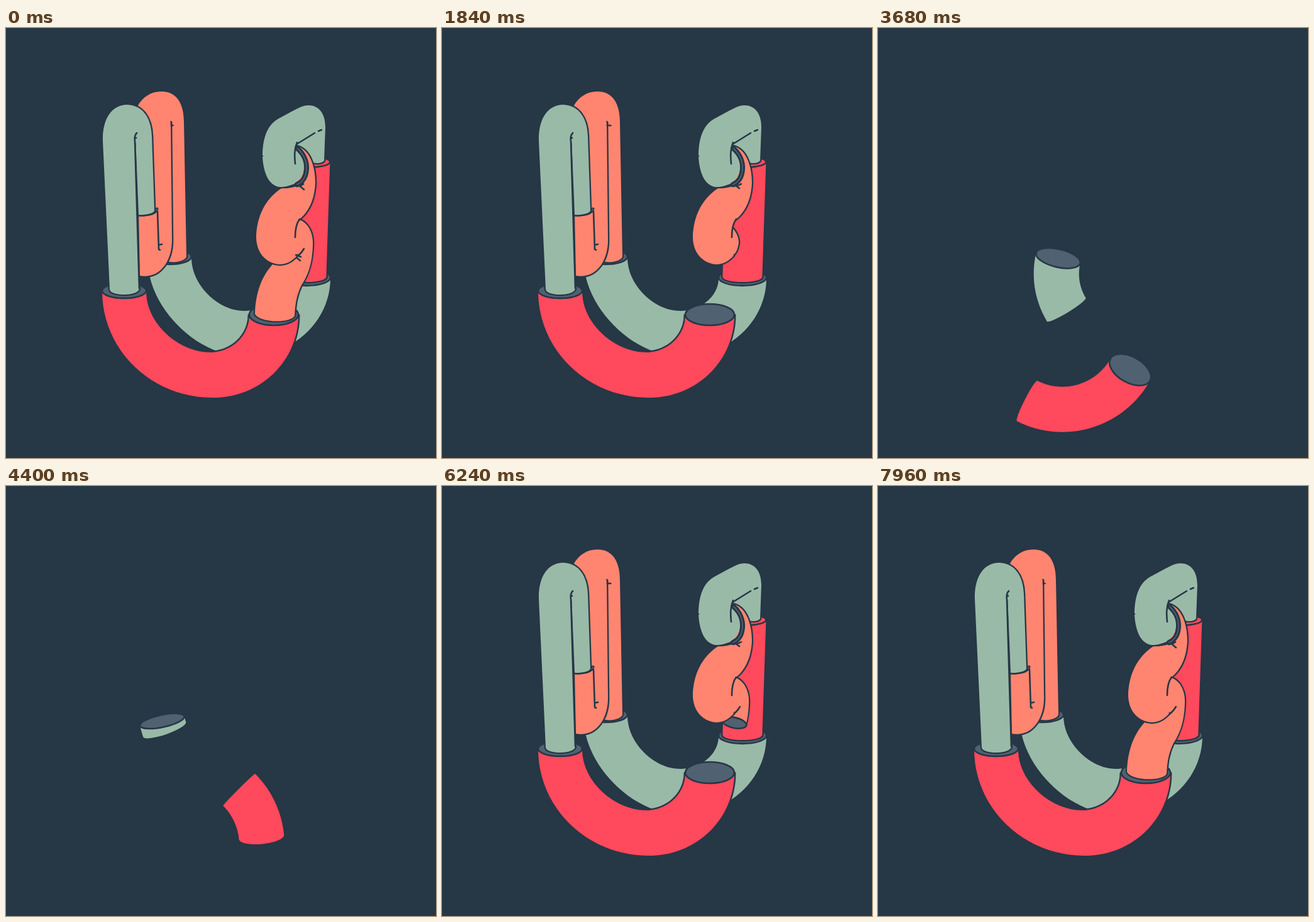
An HTML page for the animation above (8000 ms loop, 684 by 684 pixels).

```html
<!DOCTYPE html>
<html>
<head>
<meta charset="utf-8">
<style>
html, body { margin: 0; height: 100%; overflow: hidden; background: #263746; }
svg { display: block; width: 684px; height: 684px; }
.pipe { stroke: #263746; stroke-width: 5; stroke-linejoin: round; paint-order: stroke; }
</style>
</head>
<body>
<svg id="stage" viewBox="0 0 684 684"></svg>
<script>
const LOOP = 8000, INK = '#263746', RED = '#ff495c', GREEN = '#9abaa8', ORANGE = '#ff8570', SLATE = '#506172';
const stage = document.getElementById('stage');

function add(tag, attrs, parent = stage) {
  const el = document.createElementNS('http://www.w3.org/2000/svg', tag);
  set(el, attrs);
  return parent.appendChild(el);
}
function set(el, attrs) {
  for (const k in attrs) el.setAttribute(k, attrs[k]);
}
const show = (el, on) => { el.style.display = on ? '' : 'none'; };
const clamp = x => Math.min(1, Math.max(0, x));
const mix = (a, b, k) => a + (b - a) * k;
const line = (d, parent, width = 2.6, stroke = INK) => add('path', {
  d, fill: 'none', stroke, 'stroke-width': width, 'stroke-linecap': 'round', 'stroke-linejoin': 'round'
}, parent);

// Linear interpolation through rows of [time, ...values]
function track(keys, t) {
  const i = keys.findIndex(k => k[0] > t);
  if (i < 0) return keys[keys.length - 1].slice(1);
  const a = keys[i - 1], b = keys[i], k = (t - a[0]) / (b[0] - a[0]);
  return a.slice(1).map((v, j) => mix(v, b[j + 1], k));
}

// Open end of a pipe facing (dx, dy): slate when turned to the viewer, else a bulge
function placeCap(el, x, y, hw, dx, dy, color, gain = 1, forced = 0) {
  const vis = forced || gain * (0.3 * dx - 0.34 * dy), open = vis > 0.06;
  set(el, {
    rx: hw, ry: hw * Math.abs(vis), fill: open ? SLATE : color, stroke: open ? INK : 'none', 'stroke-width': 2.6,
    transform: `translate(${x} ${y}) rotate(${Math.atan2(dy, dx) * 180 / Math.PI + 90})`
  });
}

// Curved pipe: a half bowl at rest, a turning piece of a circle when k is 1
function bowl(o) {
  const body = add('path', { class: 'pipe', fill: o.color });
  const caps = [add('ellipse', {}), add('ellipse', {})];
  return t => {
    const [a0, a1, cx, cy, k] = track(o.keys, t);
    const at = deg => {
      const a = deg * Math.PI / 180, c = Math.cos(a), s = Math.sin(a), [rx, ry] = c < 0 ? o.left : o.right;
      return [mix(o.x + c * rx, cx + o.r * c, k), mix(o.y - (1 - s) * ry, cy + o.r * s, k)];
    };
    const dir = deg => {
      const p = at(deg - 0.5), q = at(deg + 0.5), x = q[0] - p[0], y = q[1] - p[1], n = Math.hypot(x, y);
      return [x / n, y / n];
    };
    const half = deg => {
      const c = Math.cos(deg * Math.PI / 180);
      return mix(c < 0 ? 36 + c : 36 + c * o.flare, 36, k);
    };
    const outer = [], inner = [];
    for (let i = 0; i <= 48; i++) {
      const a = mix(a0, a1, i / 48), p = at(a), d = dir(a), h = half(a);
      const bend = a > 90 ? (1 - k) * Math.sin(a * Math.PI / 90) ** 2 : 0;
      const out = h - o.dip * bend, into = h + 2 * bend;
      outer.push([p[0] + d[1] * out, p[1] - d[0] * out]);
      inner.unshift([p[0] - d[1] * into, p[1] + d[0] * into]);
    }
    set(body, { d: 'M' + outer.concat(inner).map(p => p.map(v => v.toFixed(2)).join(' ')).join('L') + 'Z' });
    [a0, a1].forEach((a, i) => {
      const [x, y] = at(a), [dx, dy] = dir(a), s = i ? 1 : -1;
      placeCap(caps[i], x, y - (1 - k), half(a), s * dx, s * dy, o.color, i ? 1 : o.gain);
    });
  };
}

// Drawn piece uncovered along a guide line; grow and shrink are time spans
let count = 0;
function piece(o) {
  const id = 'm' + count++;
  const mask = add('mask', { id, maskUnits: 'userSpaceOnUse', x: 0, y: 0, width: 684, height: 684 });
  const guide = add('path', { d: o.guide, fill: 'none', stroke: '#fff', 'stroke-width': o.width }, mask);
  const g = add('g', {});
  line(o.edge, g, 4.6);
  add('path', { d: o.fill, fill: o.color }, g);
  if (o.crease) line(o.crease, g);
  if (o.extra) o.extra(g);
  const cap = o.cap && add('ellipse', {});
  const length = guide.getTotalLength();
  const tick = t => {
    const part = ([a, b]) => clamp((t - a) / (b - a));
    const p = t < 4000 ? 1 - part(o.shrink) : part(o.grow);
    show(g, p > 0);
    if (p < 1) {
      g.setAttribute('mask', `url(#${id})`);
      guide.setAttribute('stroke-dasharray', `${p * length} ${length * 2}`);
    } else g.removeAttribute('mask');
    if (!cap) return;
    show(cap, p > 0 && p < 1);
    const e = guide.getPointAtLength(p * length), b = guide.getPointAtLength(p * length - 1);
    const f = guide.getPointAtLength(p * length + 1), x = f.x - b.x, y = f.y - b.y, n = Math.hypot(x, y) || 1;
    placeCap(cap, e.x, e.y, mix(o.cap[0], o.cap[1], p), x / n, y / n, o.color, 1, o.open);
  };
  tick.group = g;
  return tick;
}

function straightPipe() {
  const w = 31.5, body = add('path', { class: 'pipe', fill: RED });
  const lip = add('ellipse', { rx: w, ry: 8.5, fill: RED, stroke: INK, 'stroke-width': 2.6 });
  const keys = [[0, 213, 396], [2480, 213, 396], [2820, 290, 291], [5020, 290, 291], [5060, 288, 305],
    [5240, 277.5, 331], [5480, 213, 396]];
  return t => {
    const [top, low] = track(keys, t), on = t < 2820 || t > 5020;
    const mid = y => 484 - (y - 210) * 0.033, a = mid(top), b = mid(low);
    show(body, on);
    show(lip, on);
    set(body, { d: `M${a - w} ${top}L${b - w} ${low}A${w} 8 0 0 0 ${b + w} ${low}L${a + w} ${top}A${w} 8.5 0 0 0 ${a - w} ${top}Z` });
    set(lip, { cx: a, cy: top });
  };
}

let sideMark, knotMark, pinch;

const backBowl = bowl({
  color: GREEN, x: 380, y: 486, left: [120, 121], right: [98, 88], r: 110, flare: 2, dip: 4, gain: 1,
  keys: [[0, 0, 180, 378, 372, 0], [2760, 0, 180, 378, 372, 0], [3120, 115, 222, 433, 420, 1],
    [3400, 140, 205, 412, 411, 1], [4200, 165, 171, 360, 354, 1], [4400, 161, 168, 356, 351, 1],
    [4850, 45, 180, 378, 372, 0.1], [5040, 25, 180, 378, 372, 0], [5240, 14, 180, 378, 372, 0],
    [5400, 0, 180, 378, 372, 0]]
});
const redPipe = straightPipe();

const farLeg = piece({
  color: ORANGE, shrink: [2150, 2600], grow: [5560, 5860], width: 84, cap: [12, 14],
  guide: 'M235 190C235 125 268 120 272 160L273 380',
  fill: 'M256 371C268 375 287 370 287 363L283 150C283 118 270 101 247 101C230 101 218 110 210 123L240 180L263 150Z',
  edge: 'M256 371C268 375 287 370 287 363L283 150C283 118 270 101 247 101C230 101 218 110 210 123'
});
const bend = piece({
  color: ORANGE, shrink: [2550, 2750], grow: [5365, 5600], width: 54,
  guide: 'M228 284V350C230 395 252 395 253 345L247 130',
  fill: 'M211 296L213 394C245 400 265 370 264 335L262 150L246 120L230 150L237 288Z',
  edge: 'M213 394C245 400 265 370 264 335L262 150',
  crease: 'M241 292L243 352M243 345L248 344M243 352L245 353',
  extra: g => {
    sideMark = line('', g);
    line('M211 297C222 298 238 296 240 288', g, 5);
    line('M230 295C236 293 239 291 240 288', g, 1.8, SLATE);
  }
});

const frontBowl = bowl({
  color: RED, x: 327, y: 552, left: [139, 133], right: [99, 95], r: 124, flare: 3, dip: 0, gain: 1.28,
  keys: [[0, 0, 180, 310, 430, 0], [2700, 0, 180, 310, 430, 0], [3140, 48, 180, 310, 430, 0],
    [3360, 55, 176, 302, 471, 1], [3800, 20, 95, 290, 487, 1], [4200, -50, -20, 283, 562, 1],
    [4400, -45, -6, 283, 571, 1], [4680, -15, 92, 288, 487, 1], [4850, 5, 176, 302, 468, 1],
    [4960, 14, 180, 310, 430, 0], [5080, 13, 180, 310, 430, 0], [5240, 2, 180, 310, 430, 0],
    [5300, 0, 180, 310, 430, 0]]
});

const hook = piece({
  color: GREEN, shrink: [2720, 2840], grow: [5250, 5365], width: 44, cap: [12, 12], guide: 'M219 176L224 302',
  fill: 'M232 172L236 290C236 296 216 298 211 297L206 172Z',
  edge: 'M232 172L236 290C236 296 216 298 211 297'
});
const leftGreen = piece({
  color: GREEN, shrink: [2840, 3160], grow: [4910, 5250], width: 60, cap: [24, 12],
  guide: 'M189 428L181 182C180 140 190 140 205 145C217 150 219 165 219 186',
  fill: 'M165 416L154 180C153 145 168 122 193 122C217 123 231 142 232 172V182H206L212 414C212 427 166 427 165 416Z',
  edge: 'M165 416L154 180C153 145 168 122 193 122C217 123 231 142 232 172M165 416C166 427 212 427 212 414',
  crease: 'M212 414L205 180C204 174 206 169 208 167M205 174L207 175'
});

const knotBack = piece({
  color: GREEN, shrink: [2120, 2480], grow: [5480, 5760], width: 84, cap: [16, 28],
  guide: 'M498 216L494 160C490 135 470 140 445 160C420 180 415 225 440 232C455 232 465 225 470 212',
  fill: 'M506 211L508 158C508 136 498 123 481 123C472 123 464 128 456 132L432 145C414 156 408 178 408 205C410 235 420 252 437 253C452 253 466 249 474 236L470 200L488 214C495 216 503 215 506 211Z',
  edge: 'M488 214C495 216 503 215 506 211L508 158C508 136 498 123 481 123C472 123 464 128 456 132L432 145C414 156 408 178 408 205C410 235 420 252 437 253',
  crease: 'M462 185L491 167M497 164L502 162'
});
// Closed end of the upper twist, hidden while the lower one is out
const twistTip = piece({
  color: ORANGE, shrink: [1900, 2000], grow: [5990, 6040], width: 60, guide: 'M464 310V372',
  fill: 'M461 317C470 326 474 338 471 347C469 357 464 362 455 369Z',
  edge: 'M461 317C470 326 474 338 471 347C469 357 464 362 455 369'
});
const lowerTwist = piece({
  color: ORANGE, shrink: [1400, 1830], grow: [6050, 6515], width: 100, cap: [10, 34], open: 0.42,
  guide: 'M472 300C474 335 468 362 464 380C456 415 432 430 428 480',
  fill: 'M467 305C482 311 489 328 488 346C487 376 480 394 470 409C462 425 460 440 459 458C452 470 404 469 396 455C397 420 407 395 424 376Z',
  edge: 'M467 305C482 311 489 328 488 346C487 376 480 394 470 409C462 425 460 440 459 458C452 470 404 469 396 455C397 420 407 395 424 376',
  crease: 'M460 365Q468 361 474 351'
});
const upperTwist = piece({
  color: ORANGE, shrink: [1900, 2130], grow: [5780, 6040], width: 92,
  guide: 'M468 195C490 230 480 270 440 290C410 310 410 350 430 360C450 368 465 350 478 330',
  fill: 'M462 188C482 192 492 218 492 246C491 272 482 292 467 304C459 318 458 345 463 362C455 371 446 376 435 376C412 374 398 356 398 332C399 300 412 272 438 255L455 230Z',
  edge: 'M462 188C482 192 492 218 492 246C491 272 482 292 467 304M438 255C412 272 399 300 398 332C398 356 412 374 435 376C446 376 455 371 463 362',
  crease: 'M467 304C461 312 460 322 460 333',
  extra: g => {
    knotMark = line('', g);
    pinch = line('M461 361L469 364M463 366L468 370', g);
  }
});
const knotFront = piece({
  color: GREEN, shrink: [2060, 2200], grow: [5690, 5800], width: 84,
  guide: 'M424 180C415 235 440 250 482 212',
  fill: 'M462 190C470 198 475 212 474 225C470 242 458 252 437 253C420 252 410 235 408 205L440 180Z',
  edge: 'M408 205C410 235 420 252 437 253C446 253 455 252 463 249',
  crease: 'M463 182C458 194 459 205 460 216',
  extra: g => {
    const rim = 'M464 192C473 200 479 212 478 225C477 237 472 245 463 249';
    line(rim, g, 8);
    line(rim, g, 1.8, SLATE);
  }
});

const parts = [backBowl, redPipe, farLeg, bend, frontBowl, hook, leftGreen, knotBack, twistTip, lowerTwist,
  upperTwist, knotFront];

function frame(now) {
  const t = now % LOOP, sway = Math.cos(t * Math.PI / 2000);
  parts.forEach(draw => draw(t));
  // Gentle breathing of the soft pipes
  sideMark.setAttribute('d', `M263 150V156M263 155h${4 - 1.5 * sway}`);
  knotMark.setAttribute('d', `M461 251Q469 252 ${474 - sway} 248M468 252l${5 + sway} ${4 + sway}`);
  upperTwist.group.setAttribute('transform', `translate(${0.5 - 0.5 * sway} 0)`);
  show(pinch, t < 1200);
  requestAnimationFrame(frame);
}
requestAnimationFrame(frame);
</script>
</body>
</html>
```
